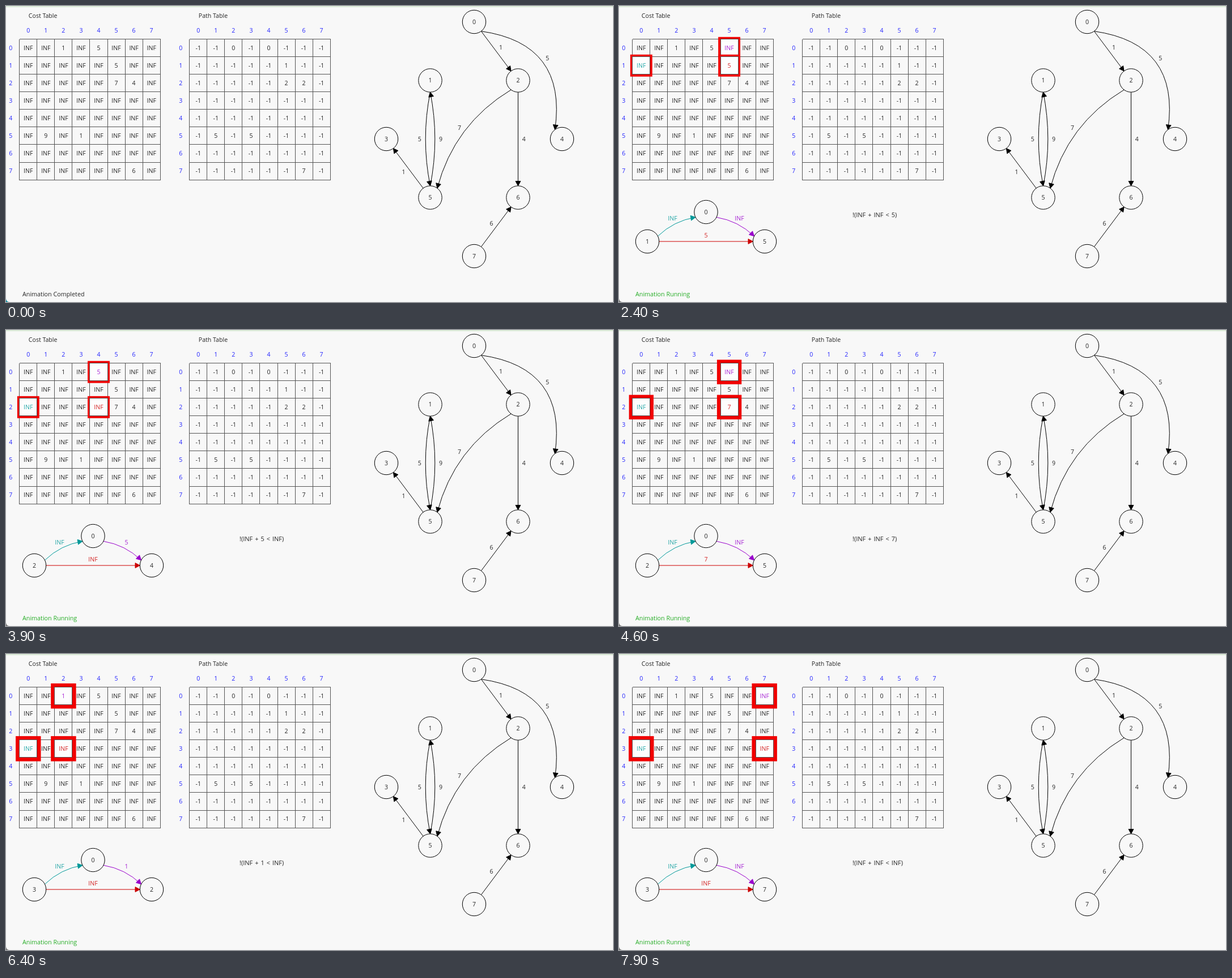
An HTML page for the animation above (8000 ms loop, 1071 by 523 pixels).

```html
<!DOCTYPE html>
<html lang="en">
<head>
<meta charset="utf-8">
<title>All-pairs shortest paths</title>
<style>
html, body { margin: 0; width: 100%; height: 100%; overflow: hidden; background: #f8f8f8; }
svg { display: block; width: 100%; height: 100%; }
text { font: 10.6px "Open Sans", "Noto Sans", sans-serif; white-space: pre; fill-opacity: .85; }
.mid { text-anchor: middle; }
.msg { font-size: 11px; word-spacing: 1.1px; }
.status { font-size: 10.75px; }
.grid { fill: none; stroke: #555; shape-rendering: crispEdges; }
</style>
</head>
<body>
<svg viewBox="0 0 1071 523">
  <g id="fixed"></g>
  <g id="moving"></g>
</svg>
<script>
const SCALE = 1.035, CELL = 30 * SCALE, R = 20 * SCALE, N = 8;
const COST_X = 39.3, PATH_X = 339.3, TOP = 74.2;
const TEAL = '#009999', PURPLE = '#9900cc', RED = '#cc0000';

const nodes = [[826, 28], [748.5, 131.5], [903.5, 131.5], [671, 235],
               [981, 235], [748.5, 338.5], [903.5, 338.5], [826, 442]];
// from, to, cost, curve
const edges = [[0, 2, 1, 0], [0, 4, 5, -.42], [1, 5, 5, .08], [2, 5, 7, .17],
               [2, 6, 4, 0], [5, 1, 9, .08], [5, 3, 1, 0], [7, 6, 6, 0]];

const cost = (i, j) => edges.find(e => e[0] === i && e[1] === j)?.[2] ?? 'INF';
const parent = (i, j) => cost(i, j) === 'INF' ? -1 : i;
const escapeText = s => String(s).replace(/</g, '&lt;');

function text(s, x, y, color = '#000', cls = 'mid') {
  return `<text x="${x}" y="${y + 3.6}" fill="${color}" class="${cls}">${escapeText(s)}</text>`;
}

function circle(label, [x, y]) {
  return `<circle cx="${x}" cy="${y}" r="${R}" fill="#f8f8f8" stroke="#000"/>` + text(label, x, y);
}

// Curved arrow between the rims of two circles, with its label beside it.
function arrow([x1, y1], [x2, y2], label, curve, color = '#000') {
  const dx = x2 - x1, dy = y2 - y1, len = Math.hypot(dx, dy);
  const ux = dx / len, uy = dy / len;
  const sx = x1 + ux * R, sy = y1 + uy * R, ex = x2 - ux * R, ey = y2 - uy * R;
  const cx = (x1 + x2) / 2 - dy * curve, cy = (y1 + y2) / 2 + dx * curve;
  const side = (curve > 0 ? 10 : -10) * SCALE;
  const lx = (sx + ex) / 4 + cx / 2 - uy * side;
  const ly = (sy + ey) / 4 + cy / 2 + ux * side;
  const d = Math.hypot(ex - cx, ey - cy), vx = (ex - cx) / d, vy = (ey - cy) / d;
  const h = 8.3, w = 4.4, bx = ex - vx * h, by = ey - vy * h;
  return `<path d="M${sx} ${sy}Q${cx} ${cy} ${ex} ${ey}" fill="none" stroke="${color}"/>` +
    `<path d="M${ex} ${ey}L${bx - vy * w} ${by + vx * w}L${bx + vy * w} ${by - vx * w}Z" fill="${color}" stroke="${color}"/>` +
    text(label, lx, ly, color);
}

function square(x, y, half, attrs) {
  return `<rect x="${x - half}" y="${y - half}" width="${2 * half}" height="${2 * half}" ${attrs}/>`;
}

// Position of a grid line, centred on a pixel so that it stays one pixel wide.
const gridLine = (start, i) => Math.floor(start + (i - .5) * CELL) + .5;

function table(title, x0, value) {
  let out = text(title, x0 + .5, 17.3, '#000', ''), lines = '';
  for (let i = 0; i <= N; i++) {
    const x = gridLine(x0, i), y = gridLine(TOP, i);
    lines += `M${x} ${gridLine(TOP, 0)}V${gridLine(TOP, N)}M${gridLine(x0, 0)} ${y}H${gridLine(x0, N)}`;
  }
  for (let i = 0; i < N; i++) {
    const x = x0 + i * CELL, y = TOP + i * CELL;
    out += text(i, x, 43, '#00f') + text(i, x0 - CELL, y, '#00f');
    for (let j = 0; j < N; j++) out += text(value(i, j), x0 + j * CELL, y);
  }
  return out + `<path d="${lines}" class="grid"/>`;
}

function marked(i, j, grow, color) {
  const x = COST_X + j * CELL, y = TOP + i * CELL;
  const left = gridLine(COST_X, j), top = gridLine(TOP, i);
  const w = gridLine(COST_X, j + 1) - left, h = gridLine(TOP, i + 1) - top;
  return square(x, y, CELL / 2 + grow, 'fill="#f00000"') +
    `<rect x="${left}" y="${top}" width="${w}" height="${h}" fill="#fdfdfd"/>` +
    `<rect x="${left}" y="${top}" width="${w}" height="${h}" class="grid"/>` +
    text(cost(i, j), x, y, color);
}

// Comparisons through vertex 0, and the time each one begins.
const steps = [];
for (let i = 1; i < 4; i++)
  for (let j = 1; j < N; j++) if (i !== j) steps.push([i, j]);
const starts = [700, 1100, 1600, 2000, 2500, 2900, 3300, 3600, 3900,
                4200, 4700, 5200, 5700, 6200, 6700, 7100, 7500, 7900];

const left = [50, 416], peak = [153.5, 364], right = [257, 416];

function status(label, color, corner) {
  return text(label, 29, 509, color, 'status') + `<path d="M0 517Q.5 522.5 6 523H0Z" fill="${corner}"/>`;
}

function scene(t) {
  const n = starts.filter(s => s <= t).length - 1;
  if (n < 0) return status('Animation Completed', '#000', '#1290a5');
  const [i, j] = steps[n];
  const a = cost(i, 0), b = cost(0, j), c = cost(i, j);
  // outline swells and shrinks between 3 and 7 units
  const phase = (t + 1200) % 1500 / 750;
  const grow = (3 + 4 * Math.abs(1 - phase)) * SCALE;
  return marked(0, j, grow, PURPLE) + marked(i, 0, grow, TEAL) + marked(i, j, grow, RED) +
    arrow(left, peak, a, -.1, TEAL) + arrow(peak, right, b, -.1, PURPLE) + arrow(left, right, c, 0, RED) +
    circle(i, left) + circle(0, peak) + circle(j, right) +
    text(`!(${a} + ${b} < ${c})`, 412, 369, '#000', 'msg') +
    status('Animation Running', '#00a000', '#777');
}

document.getElementById('fixed').innerHTML =
  '<rect width="1071" height="2.2" fill="#dcebd8"/>' +
  table('Cost Table', COST_X, cost) + table('Path Table', PATH_X, parent) +
  edges.map(([a, b, label, curve]) => arrow(nodes[a], nodes[b], label, curve)).join('') +
  nodes.map((p, i) => circle(i, p)).join('');

const moving = document.getElementById('moving');
let shown = -1;
function tick() {
  const t = Math.floor(performance.now() % 8000 / 100) * 100;
  if (t !== shown) moving.innerHTML = scene(shown = t);
  requestAnimationFrame(tick);
}
tick();
</script>
</body>
</html>
```
